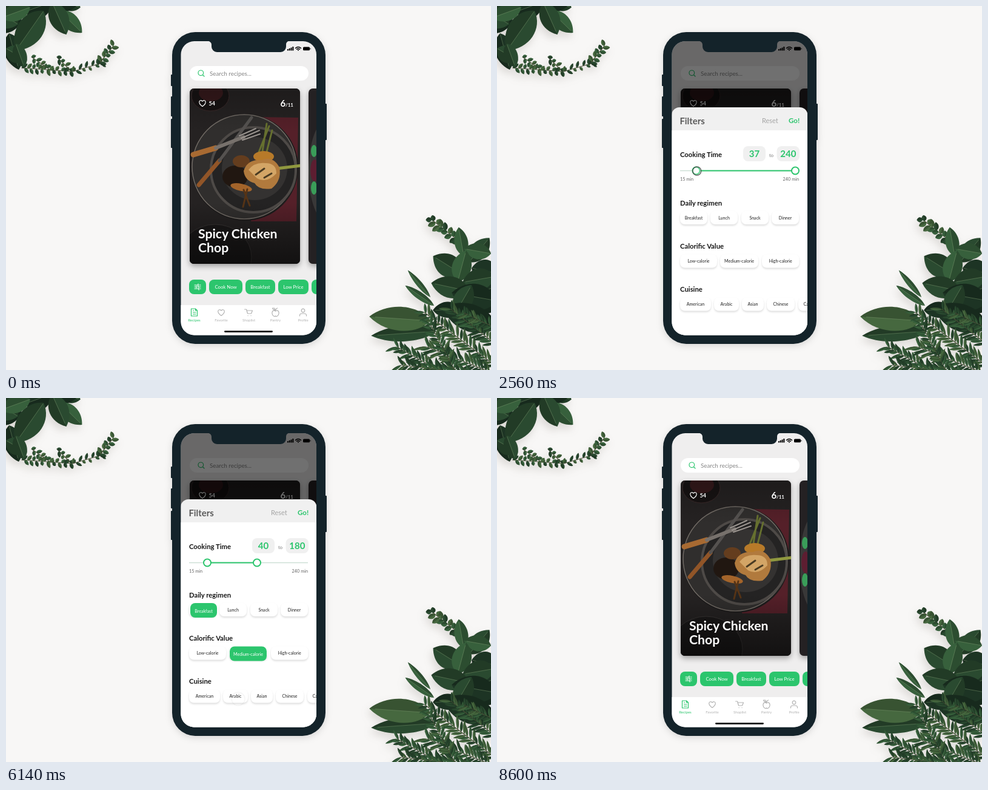
Recreate the animation shown at these times as an HTML page. Size 800 by 600 pixels, loop 9620 ms.

```html
<!DOCTYPE html>
<html lang="en">
<head>
<meta charset="utf-8">
<title>Recipe filters</title>
<style>
  html, body { margin: 0; width: 100%; height: 100%; overflow: hidden; background: #f8f7f6; }
  svg { display: block; width: 800px; height: 600px; font-family: Lato, "Open Sans", sans-serif; }
  .plant { filter: drop-shadow(-3px 7px 7px #5a50402e); }
  .phone { filter: drop-shadow(0 3px 6px #0002); }
  .card { filter: drop-shadow(0 4px 5px #0005); }
  .chip { filter: drop-shadow(0 2px 1.5px #0002); }
  .icon { fill: none; stroke-width: 1.2; stroke-linecap: round; stroke-linejoin: round; }
</style>
</head>
<body>
<svg id="stage" viewBox="0 0 800 600"></svg>
<script>
const GREEN = '#2cc56d', INK = '#14232a', LOOP = 9620;

let seed = 7;
const rnd = () => (seed = (seed * 16807) % 2147483647) / 2147483647;

// ---- drawing helpers ----
const text = (x, y, size, str, fill, weight = 400, anchor = 'start', extra = '') =>
  `<text x="${x}" y="${y}" font-size="${size}" fill="${fill}" font-weight="${weight}" text-anchor="${anchor}" ${extra}>${str}</text>`;
const rect = (x, y, w, h, r, fill, extra = '') =>
  `<rect x="${x}" y="${y}" width="${w}" height="${h}" rx="${r}" fill="${fill}" ${extra}/>`;
const oval = (x, y, rx, ry, fill, extra = '') =>
  `<ellipse cx="${x}" cy="${y}" rx="${rx}" ry="${ry}" fill="${fill}" ${extra}/>`;
const line = (d, stroke, width, extra = '') =>
  `<path d="${d}" fill="none" stroke="${stroke}" stroke-width="${width}" stroke-linecap="round" ${extra}/>`;
const icon = (x, y, d, stroke) =>
  `<path class="icon" transform="translate(${x} ${y})" d="${d}" stroke="${stroke}"/>`;

// ---- plants ----
const SHADES = ['#1d3424', '#2a4a30', '#37603c', '#46683f'];

function leaf([x, y, angle, len, w, shade]) {
  const half = s => `M0 0C${len * .2} ${s * w * .6} ${len * .7} ${s * w * .65} ${len} 0`;
  return `<g transform="translate(${x} ${y}) rotate(${angle})">
    <path d="${half(1)}${half(-1)}" fill="${SHADES[shade]}"/>
    <path d="${half(1)}" fill="#0003"/>
    ${len > 30 ? line(`M2 0H${len * .9}`, '#8aa87a', .7, 'opacity=".55"') : ''}</g>`;
}

function sprig(x0, y0, x1, y1, n, len, w, spread) {
  const dir = Math.atan2(y1 - y0, x1 - x0) * 180 / Math.PI;
  let out = line(`M${x0} ${y0}L${x1} ${y1}`, '#4c4b36', 1.2);
  for (let i = 0; i <= n; i++) {
    const k = i / n, side = i % 2 ? 1 : -1;
    out += leaf([x0 + (x1 - x0) * k, y0 + (y1 - y0) * k,
      dir + side * spread * (.6 + rnd() * .6), len * (.7 + rnd() * .5), w, 1 + Math.floor(rnd() * 3)]);
  }
  return out;
}

const topLeft = () => [
  [-8, 45, -60, 60, 40, 0], [30, 10, -20, 50, 40, 0], [20, 30, -150, 50, 40, 1],
  [5, 45, 75, 62, 34, 0], [0, 70, 30, 40, 30, 1], [92, -6, 15, 32, 22, 1],
  [70, -4, 5, 46, 26, 0], [88, 8, 44, 52, 28, 2], [76, -6, 66, 58, 34, 1],
  [62, 8, 125, 80, 46, 1], [40, 2, 160, 52, 30, 2], [16, 62, 70, 42, 24, 1]
].map(leaf).join('') +
  sprig(26, 102, 110, 108, 18, 10, 6, 65) + sprig(42, 84, 74, 106, 8, 9, 6, 65) +
  sprig(84, 84, 108, 108, 7, 9, 6, 60) + sprig(110, 108, 158, 94, 9, 10, 5, 60) +
  sprig(152, 97, 177, 66, 10, 10, 7, 60);

const bottomRight = () => sprig(748, 388, 702, 352, 14, 13, 9, 65) + [
  [700, 480, -130, 58, 10, 2], [706, 494, -145, 58, 13, 2], [760, 480, -20, 60, 80, 0],
  [755, 412, -100, 48, 24, 2], [764, 422, -50, 52, 30, 1], [800, 408, -170, 45, 28, 2],
  [752, 442, -148, 56, 40, 1], [768, 432, 12, 48, 40, 0], [745, 455, -75, 54, 34, 2],
  [806, 446, 170, 54, 38, 1], [764, 470, -168, 64, 38, 1], [810, 486, -170, 76, 46, 0],
  [742, 505, -60, 52, 34, 1], [750, 500, 178, 46, 28, 0], [810, 530, -160, 96, 48, 0],
  [710, 536, 176, 108, 28, 1], [700, 519, 184, 101, 42, 3]
].map(leaf).join('') +
  sprig(806, 592, 690, 505, 44, 21, 5, 48) + sprig(806, 556, 734, 500, 30, 19, 5, 48) +
  sprig(724, 606, 645, 562, 30, 19, 5, 48) + sprig(800, 604, 695, 562, 40, 21, 5, 48) +
  sprig(806, 530, 756, 506, 20, 17, 5, 48) + sprig(770, 606, 652, 592, 40, 19, 5, 48) +
  sprig(740, 600, 700, 525, 30, 19, 5, 48);

// ---- home screen ----
const HEART = 'M0 5.5C-9-1-4.500-7 0-3C4.500-7 9-1 0 5.500Z';

const dish = () => `<g clip-path="url(#photo)">
  ${rect(302, 135, 184, 291, 0, '#252222')}
  ${oval(337, 148, 31, 25, '#171313', 'stroke="#3b2a2a"')}${oval(338, 143, 20, 14, '#35191b')}
  <path d="M418 183L482 184L479 355L404 355Z" fill="#552029"/>
  ${oval(394, 266, 88, 88, '#1e1c1c')}
  ${oval(393, 265, 86, 86, '#302e2d', 'stroke="#716b65" stroke-width="1.5"')}
  ${oval(408, 270, 70, 70, '#242323', 'stroke="#4e4a47" stroke-width="4"')}
  ${oval(410, 268, 54, 52, '#343231')}
  ${line('M318 295L352 255', '#915528', 7)}${line('M352 255L405 184', '#555250', 5)}
  ${line('M309 245L346 234', '#a86a32', 9)}${line('M346 234L392 216', '#77716c', 6)}
  ${line('M388 218L418 205M390 221L419 211M385 214L412 202', '#9a948f', 2)}
  ${line('M415 246L434 198M422 246L430 194M428 248L439 205', '#66702f', 3)}
  ${line('M446 268L487 263', '#90983f', 5)}
  ${oval(378, 281, 21, 18, '#211711')}${oval(388, 256, 14, 10, '#643d1e')}
  ${oval(425, 248, 17, 9, '#b77a29')}${oval(388, 299, 18, 6, '#a4642a', 'transform="rotate(12 388 299)"')}
  ${line('M392 303L402 329M398 302L391 331', '#553316', 3)}
  <path d="M392 272Q398 252 422 254Q440 246 451 266Q455 288 438 301Q417 304 410 292Q394 288 392 272Z" fill="#b17a3d"/>
  <path d="M400 270Q410 257 428 259Q446 259 446 276Q430 293 414 284Z" fill="#d3a566"/>
  ${line('M412 278L426 268M426 283L438 276', '#4a3b22', 3)}
  ${oval(345, 414, 60, 54, '#1b1919', 'stroke="#393534"')}
  ${rect(302, 135, 184, 291, 0, 'url(#shade)')}</g>`;

const tab = (x, label, d, fill) =>
  icon(x, 505, d, fill) + text(x, 520, 6.1, label, fill, 400, 'middle');
const pill = (x, w, label) => rect(x, 451, w, 24, 8, GREEN) + text(x + w / 2, 465.700, 7.8, label, '#fff', 400, 'middle');

const home = () => `
  ${rect(288, 57, 225, 487, 0, '#efeeee')}
  ${rect(303, 99, 196, 24, 12, '#fff')}
  ${icon(322, 111, 'M3 3L5 5M-5-.7a4.300 4.300 0 1 0 8.600 0a4.300 4.300 0 1 0-8.600 0', GREEN)}
  ${text(336, 114.500, 9.8, 'Search recipes...', '#858585')}
  ${rect(303, 136, 182, 289, 7, '#252222', 'class="card"')}${dish()}
  ${rect(499, 136, 30, 289, 7, '#242123', 'class="card"')}
  ${oval(530, 272, 31, 84, '#393838')}${oval(508, 239, 5, 10, '#3a9d59')}
  ${oval(509, 271, 7, 18, '#5d1e31')}${oval(508, 300, 5, 11, '#3a9d59')}
  ${icon(324, 160, HEART, '#fff')}
  ${text(334.5, 164, 9, '54', '#fff', 700)}
  ${text(452.5, 166, 15, '6', '#fff', 700)}${text(461, 166, 8, '/11', '#fff', 700)}
  ${text(317, 383, 21.2, 'Spicy Chicken', '#fff', 700)}${text(317, 406, 21.2, 'Chop', '#fff', 700)}
  ${rect(302, 451, 28, 24, 8, GREEN)}
  ${icon(316, 463, 'M-5-3H0M3-3H5M-5 0H-3M0 0H5M-5 3H1M4 3H5M1-5V-1M-2-1.500V1.500M2 1.500V5', '#fff')}
  ${pill(335, 55, 'Cook Now')}${pill(395, 49, 'Breakfast')}${pill(449, 50, 'Low Price')}${rect(504, 451, 40, 24, 8, GREEN)}
  ${rect(288, 493, 225, 51, 0, '#fff')}
  ${tab(310.5, 'Recipes', 'M-5-6H2L5-3V6H-5ZM2-6V-3H5M-2-3H-1M-2 0H2.500M-2 3H2.500', GREEN)}
  ${tab(355, 'Favorite', HEART, '#b3b3b3')}
  ${tab(400.5, 'Shoplist', 'M-7-5H-4L-2 2H4L6-3H-3.500M-1.500 5.500h.2M3.500 5.500h.2', '#b3b3b3')}
  ${tab(444.5, 'Pantry', 'M0-2C-4-5-6-1-5.500 2S-2 8 0 6C2 8 5 5 5.500 2S4-5 0-2Q0-5-2-7H-5Q-4-4 0-4Q1-6 3-7', '#b3b3b3')}
  ${tab(490, 'Profile', 'M-2.800-3a2.800 2.800 0 1 0 5.600 0a2.800 2.800 0 1 0-5.600 0M-5.500 6V5Q-5.500 2-2 2H2Q5.500 2 5.500 5V6', '#b3b3b3')}
  ${rect(360, 535.200, 80, 2.8, 1.4, '#111')}`;

// ---- filter sheet ----
const chip = (x, y, w, label) =>
  rect(x, y, w, 22, 8, '#fff', 'class="chip"') + text(x + w / 2, y + 13.5, 7.1, label, '#222', 400, 'middle');
const picked = (id, x, y, w, label) => `<g id="${id}">${rect(x, y, w, 24, 8, GREEN)}
  ${text(x + w / 2, y + 15.5, 7.1, label, '#fff', 400, 'middle')}</g>`;
const heading = (y, str) => text(302, y, 11.3, str, '#161616', 700);
const knob = id => `<circle id="${id}" cy="271.500" r="6" fill="#fff"/>`;

const sheet = () => `<g id="sheet">
  ${rect(288, 167, 224.5, 400, 13, '#f0f0f0')}${rect(288, 205, 224.5, 360, 0, '#fff')}
  ${text(301.5, 195, 14.8, 'Filters', '#5a5a5a', 700)}
  ${text(437, 193, 11, 'Reset', '#a5a5a5')}${text(481, 193, 11.5, 'Go!', GREEN, 700)}
  ${heading(249, 'Cooking Time')}
  ${rect(406, 231, 37, 25, 8, '#f0f0f0')}${rect(461.5, 231, 37.5, 25, 8, '#f0f0f0')}
  ${text(424.5, 249, 15, '', '', 700, 'middle', 'id="low"')}
  ${text(480.300, 249, 15, '', '', 700, 'middle', 'id="high"')}
  ${text(452.5, 249, 7.5, 'to', '#777', 400, 'middle')}
  <path id="track" d="M302 271.500H498" stroke-width="1.300"/>
  <path id="range"/>${knob('left')}${knob('right')}
  ${text(302, 288, 7.3, '15 min', '#666')}${text(498, 288, 7.3, '240 min', '#666', 400, 'end')}
  ${heading(328.5, 'Daily regimen')}
  ${chip(302, 338, 45, 'Breakfast')}${chip(352, 338, 45, 'Lunch')}${chip(403, 338, 45, 'Snack')}${chip(453, 338, 45, 'Dinner')}
  ${picked('pick0', 304, 338, 44, 'Breakfast')}
  ${heading(399.5, 'Calorific Value')}
  ${chip(302, 409.5, 61, 'Low-calorie')}${chip(368, 409.5, 63, 'Medium-calorie')}${chip(437, 409.5, 61.5, 'High-calorie')}
  ${picked('pick1', 369, 409.5, 61, 'Medium-calorie')}
  ${heading(470.5, 'Cuisine')}
  ${chip(302, 480.5, 51, 'American')}${chip(358, 480.5, 41, 'Arabic')}${chip(404, 480.5, 36, 'Asian')}
  ${chip(445, 480.5, 46, 'Chinese')}${chip(497, 480.5, 46, 'Canadian')}
  ${picked('pick2', 358, 481, 41, 'Arabic')}</g>`;

const $ = id => document.getElementById(id);
const set = (id, attrs) => { for (const k in attrs) $(id).setAttribute(k, attrs[k]); };

$('stage').innerHTML = `<defs>
    <clipPath id="screen">${rect(288.5, 58, 223.5, 484.5, 22, '#000')}</clipPath>
    <clipPath id="photo">${rect(303, 136, 182, 289, 7, '#000')}</clipPath>
    <linearGradient id="shade" x2="0" y2="1"><stop offset="0" stop-opacity=".2"/><stop offset=".25" stop-opacity="0"/>
      <stop offset=".65" stop-opacity="0"/><stop offset="1" stop-opacity=".5"/></linearGradient></defs>
  ${rect(0, 0, 800, 600, 0, '#f8f7f6')}
  <g class="plant">${topLeft()}</g><g class="plant">${bottomRight()}</g>
  <g class="phone">${rect(274, 43, 253, 514, 38, INK)}
    ${[[272, 113, 19], [272, 149, 33], [272, 186, 48], [525, 161, 60]].map(([x, y, h]) => rect(x, y, 4, h, 1, INK)).join('')}</g>
  <g clip-path="url(#screen)">${home()}
    <rect id="dim" x="288" y="57" width="225" height="487"/>${sheet()}
    <circle id="touch"/></g>
  <path d="M331 57H469c-5 1-7 3-7 7v3a9 9 0 0 1-9 9H348a9 9 0 0 1-9-9v-3c0-4-3-6-8-7z" fill="${INK}"/>
  ${[0, 1, 2, 3].map(i => rect(464 + i * 2.8, 71 - i * 1.3, 2, 2.5 + i * 1.3, .5, '#000')).join('')}
  ${line('M477.500 69.500Q482 65.500 486.500 69.500M479.500 71.300Q482 69.300 484.500 71.300', '#000', 1.5)}
  ${oval(482, 72.800, 1, 1, '#000')}
  ${rect(490, 67.500, 11, 5.800, 1.5, '#000')}${rect(501.500, 69.300, 1, 2.200, .5, '#000')}`;

// ---- motion ----
const ramp = (t, start, span) => Math.min(1, Math.max(0, (t - start) / span));
const inOut = k => k < .5 ? 4 * k ** 3 : 1 - 4 * (1 - k) ** 3;
const ease = (t, start, span) => inOut(ramp(t, start, span));
const mix = (a, b, k) => a + (b - a) * k;
const tint = (from, to, k) => `rgb(${from.map((c, i) => Math.round(mix(c, to[i], k)))})`;
const GREEN_RGB = [44, 197, 109];

// appears, releases, from x, to x, y
const TOUCHES = [
  [1440, 2800, 311, 333, 272], [2840, 3840, 468, 414, 271.5],
  [4120, 4680, 338, 338, 356], [5120, 5680, 393, 393, 425], [6120, 6680, 383, 383, 496]
];

function drawTouch(t, slides) {
  const i = TOUCHES.findLastIndex(touch => t >= touch[0]);
  if (i < 0) return set('touch', { opacity: 0 });
  const [start, end, x0, x1, y] = TOUCHES[i];
  const gone = ramp(t, end, 200);
  const shown = ramp(t, start, 200) * (1 - gone);
  const press = ramp(t, start + 320, 200) * (1 - gone);
  set('touch', {
    cx: mix(x0, x1, slides[i] || 0), cy: y, r: 11.3 - 2.8 * shown - 1.5 * press,
    opacity: .45 * shown + .35 * press, fill: '#ffffff50', stroke: '#444', 'stroke-width': 1.5
  });
}

function draw(t) {
  const open = ease(t, 0, 800) - ease(t, 8000, 600);
  set('dim', { opacity: .56 * open });
  set('sheet', { transform: `translate(0 ${398 * (1 - open)})` });

  const active = ramp(t, 1640, 280);
  const a = ease(t, 2040, 780), b = ease(t, 3060, 800);
  const x0 = mix(308, 332, a), x1 = mix(492, 414, b);
  const stroke = tint([190, 190, 190], GREEN_RGB, active);
  const fill = tint([90, 90, 90], GREEN_RGB, active);
  set('track', { stroke: tint([200, 200, 200], [205, 224, 214], active) });
  set('range', { d: `M${x0} 271.5H${x1}`, stroke, 'stroke-width': mix(1.3, 2, active) });
  set('left', { cx: x0, stroke, 'stroke-width': mix(1, 2, active) });
  set('right', { cx: x1, stroke, 'stroke-width': mix(1, 2, active) });
  set('low', { fill });
  set('high', { fill });
  $('low').textContent = Math.ceil(mix(15, 40, a));
  $('high').textContent = Math.round(mix(240, 180, b));

  for (let i = 0; i < 3; i++) set('pick' + i, { opacity: ramp(t, 4680 + i * 1000, 340) });
  drawTouch(t, [a, b]);
}

function tick() {
  draw(performance.now() % LOOP);
  requestAnimationFrame(tick);
}
tick();
</script>
</body>
</html>
```
